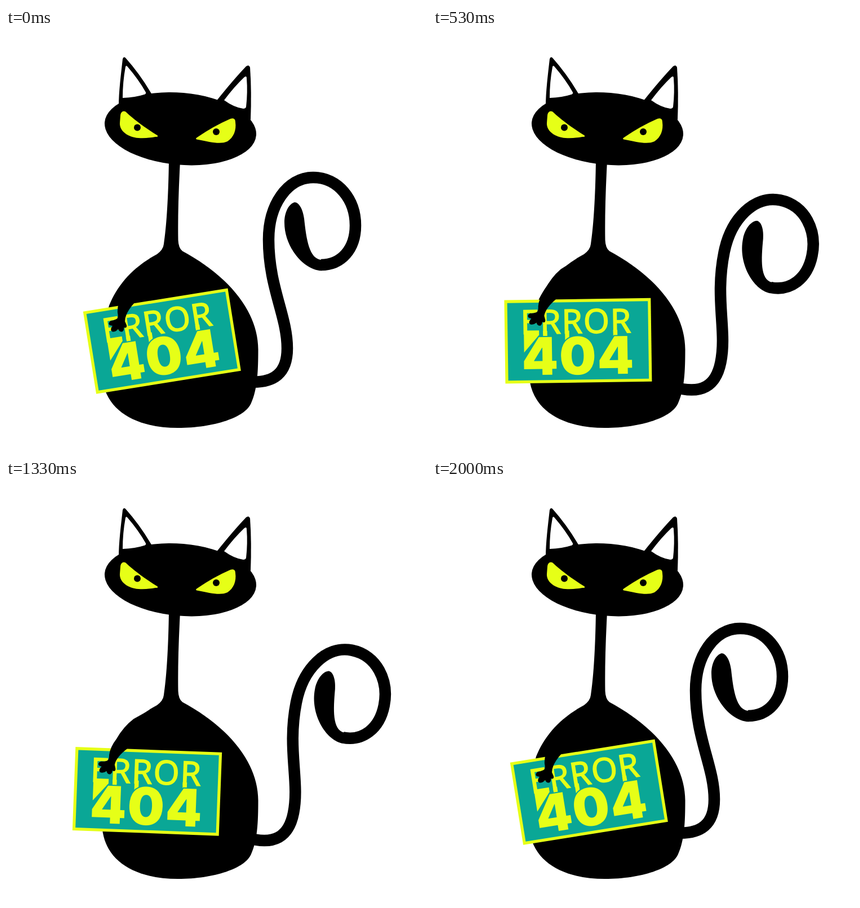
An HTML page for the animation above (2.03 s loop, 747 by 750 pixels).

```html
<!DOCTYPE html>
<html lang="en">
<head>
<meta charset="utf-8">
<title>Error 404</title>
<style>
  html, body { margin: 0; width: 100%; height: 100%; overflow: hidden; background: #fff; }
  svg { display: block; width: 100vw; height: 100vh; }
  .lime { fill: #e6ff17; }
  .word { font: 400 59px "Open Sans", "Noto Sans", sans-serif; letter-spacing: 1.9px; stroke: #e6ff17; stroke-width: 1.8; }
  .code { font: 900 92px Inter, "Open Sans", sans-serif; letter-spacing: 2px; text-anchor: middle;
          stroke: #0aa796; stroke-width: 4; paint-order: stroke; }
</style>
</head>
<body>
<svg viewBox="0 0 747 750">
  <g id="tail">
    <path fill="none" stroke="#000" stroke-width="20.500"
      d="M425 627C478 632 499 610 499 568C499 510 466 460 466 375C466 315 498 265 545 265C590 265 620 305 620 350C620 392 595 420 559 420"/>
    <path d="M512 309C520 309 527 322 529 338C533 375 538 410 560 411V430.250C530 430 494 390 494 345C494 325 503 311 512 309Z"/>
  </g>

  <path id="body" d="M289 236C288 300 285 350 280 383Q279 393 268 401C225 424 198 455 183 492C172 530 163 590 172 628C182 682 235 709 305 709C370 709 425 690 435 665C446 640 447.500 610 447.500 570C447 500 392 438 313 395.500Q306 390 305.500 376Q304.500 320 309 236Z"/>

  <g id="head">
    <ellipse cx="309.500" cy="178.700" rx="134.900" ry="63.900" transform="rotate(5 309.500 178.700)"/>
    <path d="M200 140C200 112 204 82 207 55Q209 49 213 54Q238 82 259 118L240 140Z"/>
    <path d="M372 131Q403 92 426 68Q431 64 433 70Q436 112 434 163L400 150Z"/>
    <path fill="#fff" d="M212 69Q213 65 216 69Q235 91 248 114Q249 117 245 118Q230 123 207 124Q207 96 212 69Z"/>
    <path fill="#fff" d="M387 128Q405 104 423 87Q427 84 427 89Q429 114 426 140Q425 143 421 143Q405 141 387 128Z"/>
    <path class="lime" d="M203 155C204 148 209 145 214 150C229 164 250 179 268 190Q272 193 265 193Q248 196 235 195C215 193 201 182 202 168Z"/>
    <path class="lime" d="M339 194Q368 174 398 161Q407 158 407 167C409 181 404 194 393 201C380 207 362 202 341 198Q334 197 339 194Z"/>
    <circle cx="233" cy="176.500" r="6"/>
    <circle cx="373" cy="184" r="6"/>
  </g>

  <g id="sign">
    <rect class="lime" x="-145" y="59.500" width="260" height="148"/>
    <rect fill="#0aa796" x="-139.800" y="64.700" width="249.600" height="137.600"/>
    <text class="lime word" x="-116.500" y="120">ERROR</text>
    <path class="lime" d="M-111 114H-84V122L-111 153ZM-77 115h7.500v13l-7.500 6ZM-38 115h7.500v14l-7.500 6ZM47.500 115h7.500v13l-7.500 7Z"/>
    <text class="lime code" x="-15" y="193">404</text>
  </g>

  <path id="arm" d="M260 408Q243 421 228 434Q213 451 205 475Q197 491 198 505Q200 514 196 516Q190 519 186 519Q180 523 184 527L189 528Q184 535 188 538Q193 540 199 534Q202 540 207 538Q210 535 209 531Q215 533 214 527L211 520Q211 506 228 487L262 460Z"/>
</svg>
<script>
  const LOOP = 2030, FRAME = 1000 / 30;
  const SHOULDER = [270.5, 421], REST = -9.1, SIGN_SWING = 15;
  const TAIL_ROOT = [381, 637], TAIL_SWING = 11.7;
  const SIGN_STOPS = [0, 30, 60];
  const TAIL_STOPS = [0, 15, 28, 42, 60];
  const part = id => document.getElementById(id);
  const [tail, sign, arm] = ["tail", "sign", "arm"].map(part);

  // Eases back and forth between 0 and 1, turning at each stop.
  function swing(frame, stops) {
    let i = 0;
    while (i < stops.length - 2 && frame >= stops[i + 1]) i++;
    const p = (frame - stops[i]) / (stops[i + 1] - stops[i]);
    const eased = (1 - Math.cos(Math.PI * p)) / 2;
    return i % 2 ? 1 - eased : eased;
  }

  function draw(ms) {
    const frame = Math.min(60, Math.floor((ms % LOOP + 3.4) / FRAME));
    const turn = SIGN_SWING * swing(frame, SIGN_STOPS);
    sign.setAttribute("transform", `translate(${SHOULDER}) rotate(${REST + turn})`);
    arm.setAttribute("transform", `rotate(${turn},${SHOULDER})`);
    tail.setAttribute("transform", `rotate(${TAIL_SWING * swing(frame, TAIL_STOPS)},${TAIL_ROOT})`);
  }

  const start = performance.now();
  function tick() {
    draw(performance.now() - start);
    requestAnimationFrame(tick);
  }
  tick();
</script>
</body>
</html>
```
